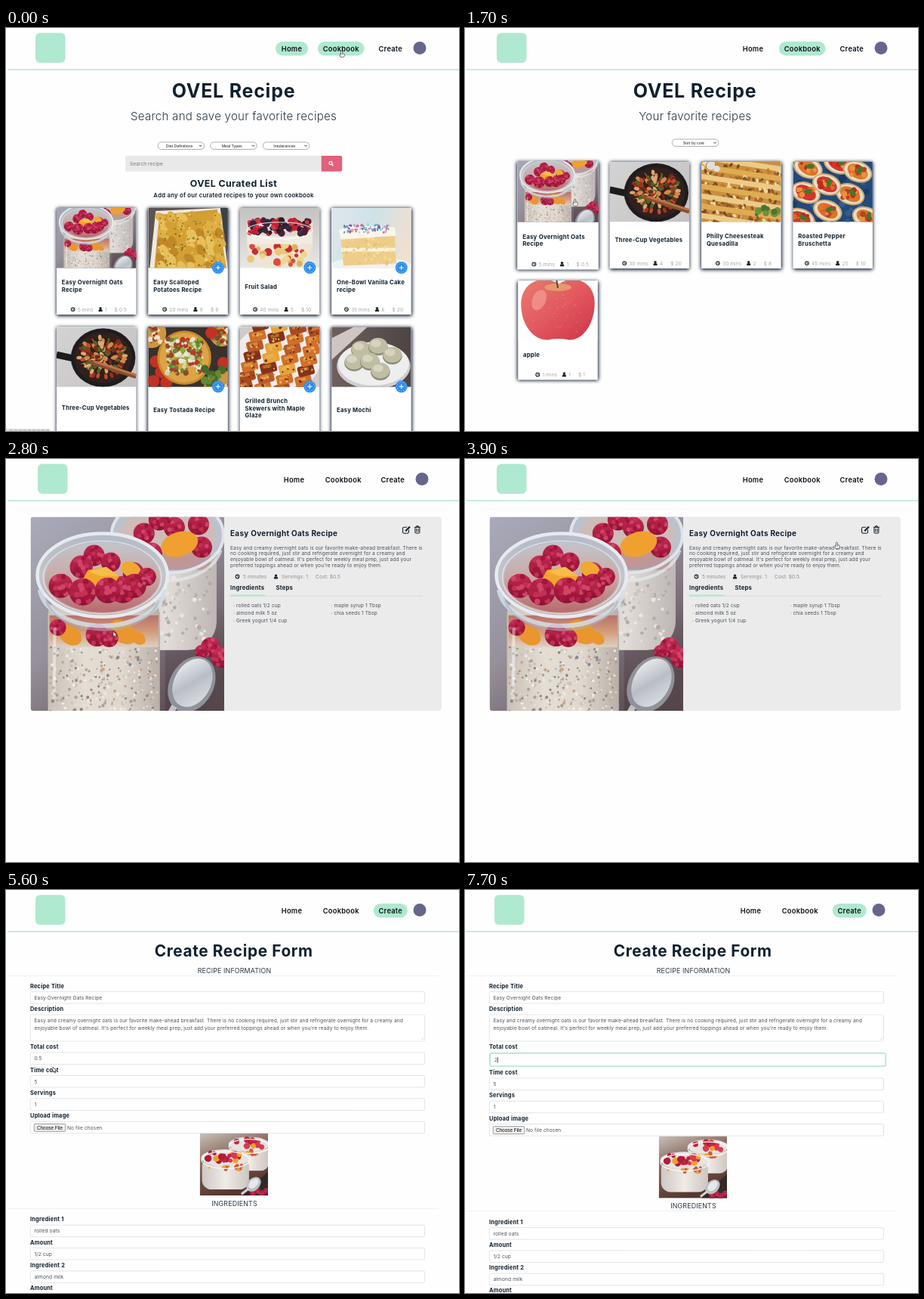
An HTML page with a canvas that plays this animation: 600x533 px, repeating every 8000 ms.

```html
<!DOCTYPE html>
<html lang="en">
<head>
<meta charset="utf-8">
<title>Recipe app demo</title>
<style>
html, body { margin: 0; width: 100%; height: 100%; overflow: hidden; background: #fefefe; }
canvas { display: block; }
</style>
</head>
<body>
<canvas id="stage" width="600" height="533"></canvas>
<script>
const g = document.getElementById('stage').getContext('2d');
const LOOP = 8000, STEP = 100;
const INK = '#10202f', GREY = '#8c8c8c', BODY = '#4c525a', MINT = '#afe9cf';
const SANS = 'Inter, sans-serif', ARIAL = '"Liberation Sans", Arial, sans-serif';

// ---------- drawing helpers ----------
let seed = 1;
const rnd = () => (seed = seed * 16807 % 2147483647) / 2147483647;
const pick = list => list[Math.floor(rnd() * list.length)];

function rect(x, y, w, h, c) { g.fillStyle = c; g.fillRect(x, y, w, h); }
function box(x, y, w, h, r, fill, stroke, lw = 0.7) {
  g.beginPath(); g.roundRect(x, y, w, h, r);
  if (fill) { g.fillStyle = fill; g.fill(); }
  if (stroke) { g.strokeStyle = stroke; g.lineWidth = lw; g.stroke(); }
}
function oval(x, y, rx, ry, c, rot = 0) {
  g.beginPath(); g.ellipse(x, y, rx, ry, rot, 0, 7); g.fillStyle = c; g.fill();
}
const dot = (x, y, r, c) => oval(x, y, r, r, c);
function ring(x, y, rx, ry, c, lw, from = 0, to = 7) {
  g.beginPath(); g.ellipse(x, y, rx, ry, 0, from, to);
  g.strokeStyle = c; g.lineWidth = lw; g.stroke();
}
function line(c, lw, ...p) {
  g.beginPath();
  for (let i = 0; i < p.length; i += 2) g.lineTo(p[i], p[i + 1]);
  g.strokeStyle = c; g.lineWidth = lw; g.stroke();
}
function poly(c, ...p) {
  g.beginPath();
  for (let i = 0; i < p.length; i += 2) g.lineTo(p[i], p[i + 1]);
  g.closePath(); g.fillStyle = c; g.fill();
}
function fade(x0, y0, x1, y1, ...cols) {
  const f = g.createLinearGradient(x0, y0, x1, y1);
  cols.forEach((c, i) => f.addColorStop(i / (cols.length - 1), c));
  return f;
}
function scatter(n, [x, y, w, h], cols, r, flat = 1) {
  for (let i = 0; i < n; i++) {
    const s = r * (0.6 + 0.8 * rnd());
    oval(x + rnd() * w, y + rnd() * h, s, s * flat, pick(cols), rnd() * 3);
  }
}
function setFont(size, weight, family) {
  g.font = `${weight} ${size}px ${family}`;
  g.letterSpacing = family === SANS ? size * (weight >= 600 ? 0.03 : 0.015) + 'px' : '0px';
}
function text(s, x, y, size, weight = 400, color = INK, align = 'left', family = SANS) {
  setFont(size, weight, family);
  g.fillStyle = color; g.textAlign = align;
  g.fillText(s, x, y);
}
function widthOf(s, size) { setFont(size, 400, SANS); return g.measureText(s).width; }

// Clips a box and draws a picture of natural width `nat` inside it.
function photo(x, y, w, h, draw, nat = w, dy = 0) {
  g.save();
  g.beginPath(); g.rect(x, y, w, h); g.clip();
  g.translate(x, y + dy); g.scale(w / nat, w / nat);
  seed = 77;
  draw();
  g.restore();
}

// ---------- food pictures ----------
function berry(x, y, r) {
  dot(x, y, r, fade(x, y - r, x, y + r, '#c62c55', '#8c0f31'));
  for (let k = 0; k < 3; k++) for (let a = k; a < k + 6; a += 1 + k * 0.7) {
    const d = r * (0.78 - k * 0.3);
    dot(x + Math.cos(a) * d, y + Math.sin(a) * d, r * 0.21, pick(['#d04468', '#b41f45', '#a0173b', '#c23056']));
  }
}

function jar() {
  rect(0, 0, 256, 256, fade(0, 0, 190, 256, '#a9abba', '#96909a', '#5c4d53'));
  rect(178, 120, 78, 136, fade(200, 120, 200, 256, 'rgba(90,76,82,0)', '#54454a'));
  // back jar
  box(112, 10, 134, 166, [20, 20, 38, 38], fade(112, 0, 246, 0, '#c3bebd', '#e2ddd8', '#bdb6b4'));
  scatter(90, [120, 78, 118, 88], ['#cbc4bf', '#ebe6e1', '#b3aba8'], 2.2);
  oval(181, 24, 75, 50, '#bcc1cb');
  oval(181, 26, 63, 40, '#cdbcb8');
  rect(124, 46, 114, 24, 'rgba(178,92,92,.4)');
  [[150, 22], [170, 4], [190, 14], [222, 10], [226, 40], [160, 48]].forEach(p => berry(...p, 14));
  oval(197, 36, 25, 16, '#efa02f', -0.3);
  ring(181, 24, 74, 50, '#dfe4ea', 4);
  ring(181, 34, 72, 50, 'rgba(228,233,238,.75)', 4, 0.2, 2.9);
  // front jar
  box(23, 104, 148, 190, 26, fade(23, 0, 171, 0, '#c9c1b8', '#e3ddd4', '#dfd8cf', '#b9afa8'));
  rect(25, 130, 144, 42, fade(0, 130, 0, 172, '#b97169', '#d39a79', '#ddd0c4'));
  [[52, 156, 17], [122, 152, 20], [142, 160, 11]].forEach(([x, y, r]) => oval(x, y, r, r * 0.7, '#e9962f', 0.6));
  [[88, 156, 15], [104, 160, 12], [36, 146, 11]].forEach(p => berry(...p));
  scatter(300, [26, 172, 142, 84], ['#efeae2', '#cdc5bb', '#8b8886', '#e6ded4', '#c9a58c', '#a8a29d'], 1.6);
  oval(95, 77, 87, 55, fade(0, 22, 0, 132, '#b4bac6', '#c5c4ca', '#c1a5a4'));
  oval(95, 80, 76, 46, fade(0, 34, 0, 126, '#c3c4cb', '#c9a9a6', '#b8696b'));
  [[84, 51, 14], [106, 60, 13], [67, 66, 15], [122, 96, 18], [136, 74, 14]].forEach(p => berry(...p));
  poly('#f2a52c', 66, 88, 76, 70, 100, 66, 117, 78, 108, 96, 82, 101);
  poly('#f7bd49', 76, 72, 100, 66, 117, 78, 92, 78);
  oval(133, 70, 14, 10, '#f0a832', 0.5);
  [[40, 91, 16], [69, 99, 18], [102, 97, 17], [137, 91, 16], [154, 79, 12]].forEach(p => berry(...p));
  ring(95, 77, 86, 55, '#e6ebf0', 4.5);
  ring(95, 80, 78, 48, 'rgba(245,248,250,.55)', 1.5);
  ring(95, 91, 83, 53, 'rgba(214,223,232,.85)', 6, 0.1, 3.04);
  ring(95, 101, 76, 48, 'rgba(168,178,190,.6)', 3, 0.2, 2.94);
  line('rgba(255,255,255,.45)', 4, 32, 146, 31, 240);
  // spoon and loose berries
  [[238, 172, 13], [252, 186, 13], [226, 178, 9]].forEach(p => berry(...p));
  oval(213, 221, 29, 39, '#8f9299', 0.5);
  oval(214, 219, 24, 34, fade(195, 190, 230, 250, '#f0f2f4', '#b9bec6', '#dfe2e6'), 0.5);
  line('#bfc2c8', 8, 190, 250, 180, 268);
}

function bowls() {
  rect(0, 0, 90, 82, fade(0, 0, 30, 82, '#c9c0ba', '#806052', '#56372e'));
  poly('#332927', 56, 82, 90, 50, 90, 82);
  function bowl(x, y, r) {
    box(x - r, y, r * 2, r * 1.35, r * 0.4, fade(x - r, 0, x + r, 0, '#cfc8c4', '#efebe7', '#cdc5c0'));
    oval(x, y, r * 1.04, r * 0.36, '#e6e3e2');
    scatter(18, [x - r * 0.75, y - 7, r * 1.4, 11], ['#c3243f', '#b01c3c', '#d93a4d', '#f0a028'], r * 0.13);
    scatter(10, [x - r * 0.8, y + 10, r * 1.55, 5], ['#e9a038', '#ce5a42'], 3, 0.7);
    ring(x, y + 3, r * 1.02, r * 0.36, '#f8f8f8', 1.3);
  }
  bowl(65, 14, 26);
  bowl(34, 32, 31);
  for (let i = 0; i < 4; i++) berry(70 + i * 6, 79 - i % 2 * 3, 4);
  oval(71, 67, 8, 11, '#bdbfc4', 0.8);
  oval(71, 66, 5, 8, '#e7e8ea', 0.8);
  line('#d5d5d8', 3, 64, 73, 55, 80);
}

const foods = {
  potatoes() {
    rect(0, 0, 106, 80, '#5c5452');
    poly('#f0e9df', 10, 4, 96, 0, 106, 80, 2, 80);
    poly('#cf9c33', 15, 9, 92, 2, 104, 80, 8, 80);
    for (let r = 0; r < 7; r++) for (let c = 0; c < 7; c++) {
      oval(17 + c * 12.5 + rnd() * 5, 13 + r * 11, 9, 5.5, pick(['#dfb044', '#e8c05a', '#d3a034', '#bf8829']), 0.4 + rnd());
    }
    scatter(110, [13, 7, 86, 72], ['#5e7c2e', '#a58a2f', '#a86b1d', '#f0d27c'], 1.1);
    poly('#3d4047', 96, 0, 106, 0, 106, 60);
  },
  salad() {
    rect(0, 0, 106, 80, fade(0, 0, 0, 80, '#c3c3c2', '#e9e7e5'));
    box(9, 18, 88, 64, [2, 2, 36, 36], '#eee4d4');
    scatter(34, [14, 48, 78, 28], ['#c92d31', '#e8c877', '#f1d58e', '#dc4a42', '#d9b25e'], 4.2);
    rect(11, 35, 84, 13, '#f1ece2');
    oval(53, 27, 44, 11, '#dfd8d0');
    scatter(105, [12, 16, 80, 18], ['#30283f', '#c51f2e', '#e0353c', '#4d1f38', '#251f30'], 3.3);
    ring(53, 30, 44, 11, 'rgba(255,255,255,.7)', 1.2);
  },
  cake() {
    rect(0, 0, 106, 80, fade(0, 0, 106, 40, '#dfe7ea', '#cfe2e8', '#f0e0cf'));
    oval(52, 78, 56, 13, '#f0f1f2');
    poly('#eecd8a', 12, 38, 84, 33, 86, 74, 16, 77);
    rect(13, 53, 72, 5, '#fbf2dc');
    scatter(70, [15, 40, 68, 34], ['#e6c378', '#f5dda3', '#efcf8e'], 1.7);
    poly('#fbf6ea', 10, 29, 34, 23, 84, 26, 86, 37, 12, 42);
    scatter(80, [16, 22, 60, 11], ['#d65c92', '#5ba8cf', '#7a5ca8', '#f0a0b8', '#8fd0e0'], 1.7, 0.6);
  },
  veg() {
    rect(0, 0, 106, 80, fade(0, 0, 106, 80, '#d4d3d3', '#c4c2c2'));
    line('#1d1b1c', 9, 0, 37, 28, 43);
    oval(62, 41, 43, 39, '#1f1c1d');
    oval(62, 41, 38, 34, '#30211e');
    for (let i = 0; i < 150; i++) {
      const a = rnd() * 6.3, d = Math.sqrt(rnd());
      oval(62 + Math.cos(a) * 32 * d, 40 + Math.sin(a) * 27 * d, 3.7, 2.3,
        pick(['#9f2f1d', '#c9492a', '#6b2f1c', '#d08a4a', '#4f6328', '#3d1813', '#d9a872']), a);
    }
    line('#8b4d2e', 6, 44, 46, 106, 66);
    line('#b8744b', 3, 50, 46, 106, 64);
  },
  tostada() {
    rect(0, 0, 106, 80, '#3a302c');
    [[4, 8, 20], [98, 10, 16], [98, 82, 24]].forEach(([x, y, r]) => {
      dot(x, y, r, '#cf9540');
      scatter(22, [x - 12, y - 12, 24, 24], ['#a8321f', '#6d8a34', '#eedfc7', '#7c4a2c'], 3);
    });
    [[10, 46], [17, 60], [7, 72], [24, 74], [100, 48], [84, 8]].forEach(p => dot(...p, 8, '#c23124'));
    dot(48, 41, 36, '#c98a2b');
    dot(48, 41, 33, '#dba447');
    scatter(190, [25, 16, 46, 46], ['#8bab3a', '#5f8a2f', '#eee4d2', '#b8382b', '#8f4a2e', '#d0d6aa'], 2.7);
    scatter(14, [75, 55, 25, 22], ['#628a35', '#456b28'], 4);
  },
  skewers() {
    rect(0, 0, 106, 80, '#d0cbc8');
    oval(50, 42, 58, 46, '#efecea');
    for (let r = 0; r < 4; r++) for (let c = 0; c < 7; c++) {
      g.save();
      g.translate(6 + r * 25 + c * 3.5, 79 - c * 13.5 + r * 2);
      g.rotate(-0.25);
      box(-11, -7, 22, 14, 3, pick(['#a8481d', '#d0702a', '#e8a23a', '#84331a', '#bb5a28']));
      rect(-7, -4, 11, 4, 'rgba(255,198,92,.4)');
      scatter(5, [-8, -4, 16, 9], ['#6d2a14', '#e9b050'], 1.3);
      g.restore();
    }
    scatter(25, [8, 8, 90, 65], ['#63782c', '#f2c460'], 1);
  },
  mochi() {
    rect(0, 0, 106, 80, fade(0, 0, 106, 0, '#6f605d', '#4b4544'));
    poly('#cfc6c2', 0, 15, 30, 0, 48, 0, 0, 44);
    oval(56, 52, 49, 31, '#cfcdcf');
    oval(56, 49, 47, 29, '#efeeef');
    [[39, 29], [62, 25], [30, 46], [81, 37], [51, 45], [65, 58]].forEach(([x, y]) => {
      oval(x, y + 2, 13, 11, '#8f8d77');
      oval(x, y, 12.5, 10.5, '#bfbea2');
      oval(x - 3, y - 3, 7, 5, '#d6d4c0');
    });
  },
  quesadilla() {
    rect(0, 0, 106, 80, '#c98f40');
    for (let i = 0; i < 8; i++) {
      const y = i * 13 - 10;
      poly(i % 2 ? '#e0ac52' : '#ecca85', 0, y, 106, y + 16, 106, y + 23, 0, y + 7);
      for (let k = 0; k < 34; k++) {
        const x = rnd() * 106;
        oval(x, y + 8 + x * 0.15 + rnd() * 7, 3, 1.8, pick(['#7a4a22', '#a86a2a', '#f0dba4', '#c47a2a', '#8c5a30']), rnd() * 3);
      }
    }
    scatter(8, [70, 60, 36, 20], ['#49742f', '#6b913d'], 4);
    scatter(8, [0, 0, 25, 10], ['#dfe1dc', '#b8833f'], 4);
  },
  bruschetta() {
    rect(0, 0, 106, 80, '#234a78');
    scatter(40, [0, 0, 106, 80], ['#1a3c66', '#2f5d8e'], 4);
    [[20, 8], [60, 2], [86, 13], [17, 41], [76, 43], [45, 30], [46, 65], [10, 76], [98, 74]].forEach(([x, y], i) => {
      oval(x, y, 20, 14, '#cfa878', 0.35);
      oval(x, y, 18, 12, '#ecddc4', 0.35);
      oval(x, y, 14.5, 9, i % 2 ? '#d5342a' : '#d9772a', 0.5);
      scatter(12, [x - 10, y - 6, 20, 11], ['#e8652c', '#c3271f', '#e9913e', '#b5461f'], 3);
      oval(x + 3, y - 2, 5.5, 3.2, '#3f7a2c', i);
    });
  },
  apple() {
    rect(0, 0, 106, 80, '#fefefe');
    g.beginPath();
    g.moveTo(54, 5);
    g.bezierCurveTo(70, -8, 102, -2, 102, 30);
    g.bezierCurveTo(102, 58, 86, 80, 68, 79);
    g.quadraticCurveTo(53, 76, 40, 79);
    g.bezierCurveTo(20, 80, 4, 58, 4, 32);
    g.bezierCurveTo(4, -2, 38, -8, 54, 5);
    g.fillStyle = fade(20, 0, 85, 80, '#e8756c', '#e2585f', '#cf3a4c');
    g.fill();
    oval(53, 9, 18, 5, '#e39a70');
    oval(28, 26, 9, 14, 'rgba(255,196,186,.4)', 0.4);
    scatter(50, [20, 18, 68, 50], ['rgba(247,176,150,.4)'], 0.7);
    line('#6b4526', 2.2, 53, 10, 51, -2);
  }
};

// ---------- icons ----------
function clock(x, y) {
  dot(x, y, 2.9, '#1a2430');
  dot(x, y, 1.8, '#fff');
  line('#1a2430', 0.8, x, y - 1.6, x, y + 0.3, x + 1.4, y + 0.3);
}
function person(x, y) {
  dot(x, y - 1.4, 1.7, '#1a2430');
  box(x - 2.6, y - 0.1, 5.2, 3, [1.8, 1.8, 0.5, 0.5], '#1a2430');
}
function badge(x, y) {
  dot(x, y, 8, '#2f8de8');
  for (let a = 0; a < 6.2; a += Math.PI / 6) dot(x + Math.cos(a) * 6, y + Math.sin(a) * 6, 0.7, '#8cc4f8');
  line('#e2f0fd', 1.2, x - 3, y, x + 3, y);
  line('#e2f0fd', 1.2, x, y - 3, x, y + 3);
}
function select(x, y, label) {
  box(x, y, 61.5, 9.5, 4.7, '#fff', '#8d8d8d');
  text(label, x + 28.5, y + 6.6, 5.3, 400, '#222', 'center', ARIAL);
  line('#222', 0.9, x + 55, y + 3.9, x + 56.7, y + 5.6, x + 58.4, y + 3.9);
}

// ---------- page parts ----------
function header(dx, active) {
  box(42 + dx, 6.5, 39.5, 39.5, 6, MINT);
  [['Home', 381.5, 43], ['Cookbook', 446.7, 61.5], ['Create', 512.3, 45]].forEach(([s, x, w]) => {
    if (active.includes(s)) box(x + dx - w / 2, 18, w, 18.5, 9.2, MINT);
    text(s, x + dx, 30.7, 9.3, 600, '#0b1118', 'center');
  });
  dot(551 + dx, 26.5, 8.5, '#66668c');
  rect(2, 54.3, 598, 1.4, MINT);
}

const CARD = 105.4;
function card({ x, y, h, data, hover, marked }) {
  const [food, title, base, mins, people, cost] = data;
  g.save();
  if (hover) {
    const cx = x + CARD / 2, cy = y + h / 2;
    g.translate(cx, cy); g.scale(1.02, 1.02); g.translate(-cx, -cy);
  }
  g.shadowColor = 'rgba(12,24,46,.8)'; g.shadowBlur = 5; g.shadowOffsetY = 1;
  rect(x, y, CARD, h, '#fff');
  rect(x, y, CARD, h, '#fff');
  g.shadowColor = 'transparent';
  if (food === 'oats') photo(x, y, CARD, 79.5, jar, 256, -13);
  else photo(x, y, CARD, 79.5, foods[food], 106);
  title.split('|').forEach((s, i) => text(s, x + 6.8, y + base + i * 9.5, 7.7, 700));
  const time = mins + ' mins', price = '$ ' + cost, n = String(people), s = 6.6;
  const a = widthOf(time, s), b = widthOf(n, s), c = widthOf(price, s);
  const my = y + h - 4.5;
  let px = x + 56 - (a + b + c + 34) / 2;
  clock(px + 2.8, my - 2.4); px += 9;
  text(time, px, my, s, 300, GREY); px += a + 6.5;
  person(px + 2.6, my - 2.5); px += 8.5;
  text(n, px, my, s, 300, GREY); px += b + 10;
  text(price, px, my, s, 300, GREY);
  if (marked) badge(x + 92.5, y + 79);
  g.restore();
}

// Lays recipes out four to a row.
function grid(list, x0, y0, rowGap, heights, extra = {}) {
  return list.map((data, i) => {
    const row = Math.floor(i / 4);
    return { x: x0 + (i % 4) * 121.4, y: y0 + row * rowGap, h: heights[row], data, marked: extra.badges && i % 4 > 0 };
  });
}
const OATS = ['oats', 'Easy Overnight Oats|Recipe', 101, 5, 1, 0.5];
const curated = grid([
  OATS,
  ['potatoes', 'Easy Scalloped|Potatoes Recipe', 101, 20, 8, 8],
  ['salad', 'Fruit Salad', 107, 40, 5, 10],
  ['cake', 'One-Bowl Vanilla Cake|recipe', 101, 35, 6, 20],
  ['veg', 'Three-Cup Vegetables', 110, 30, 4, 20],
  ['tostada', 'Easy Tostada Recipe', 113, 25, 4, 12],
  ['skewers', 'Grilled Brunch|Skewers with Maple|Glaze', 101, 30, 6, 18],
  ['mochi', 'Easy Mochi', 113, 30, 6, 8]
], 67, 238, 157.3, [141, 150], { badges: true });
const saved = grid([
  OATS,
  ['veg', 'Three-Cup Vegetables', 105.5, 30, 4, 20],
  ['quesadilla', 'Philly Cheesesteak|Quesadilla', 101, 30, 2, 8],
  ['bruschetta', 'Roasted Pepper|Bruschetta', 101, 45, 25, 10],
  ['apple', 'apple', 101, 1, 1, 1]
], 70.3, 177, 157, [141, 131.3]);
const inside = (c, [x, y]) => x > c.x && x < c.x + CARD && y > c.y && y < c.y + c.h;

function statusBar() {
  rect(0, 530, 58.5, 3, '#dcdee0');
  for (let x = 5; x < 54; x += 6) rect(x, 531.5, 4, 1, '#a9adb2');
}

function home() {
  header(-3, ['Home', 'Cookbook']);
  text('OVEL Recipe', 301.5, 92, 25, 700, INK, 'center');
  text('Search and save your favorite recipes', 301.5, 121.5, 15.1, 300, '#2b3846', 'center');
  select(201, 151, 'Diet Definitions');
  select(270.7, 151, 'Meal Types');
  select(340.3, 151, 'Intolerances');
  box(158, 169, 260, 20.7, [2, 0, 0, 2], '#e9e9e9');
  text('Search recipe', 164, 181.8, 6.5, 400, '#777');
  box(417.7, 169, 27.5, 20.7, [0, 2, 2, 0], '#e2607b');
  ring(430, 178.7, 2, 2, '#fff', 1.2);
  line('#fff', 1.4, 431.5, 180.2, 433.5, 182.2);
  text('OVEL Curated List', 301.5, 209.7, 12.4, 700, INK, 'center');
  text('Add any of our curated recipes to your own cookbook', 301.5, 224, 7.75, 600, INK, 'center');
  curated.forEach(card);
}

function cookbook(at) {
  header(0, ['Cookbook']);
  text('OVEL Recipe', 304.5, 92, 25, 700, INK, 'center');
  text('Your favorite recipes', 304.8, 121.5, 15.1, 300, '#2b3846', 'center');
  select(274.3, 147, 'Sort by cost');
  saved.forEach(c => card({ ...c, hover: inside(c, at) }));
}

function recipe() {
  header(0, []);
  g.save();
  g.beginPath(); g.roundRect(32.5, 76.5, 544.5, 256.5, 4); g.clip();
  rect(32, 76, 546, 258, '#ebebeb');
  photo(32.5, 76.5, 256.5, 256.5, jar, 256);
  g.restore();
  text('Easy Overnight Oats Recipe', 297, 102.2, 9.95, 700);
  // edit and trash icons
  box(525.5, 90.2, 8, 8, 1.6, null, INK, 1.1);
  line('#ebebeb', 4, 529.5, 94.5, 536, 88.5);
  line(INK, 2.2, 529.2, 95.2, 535, 89.5);
  line(INK, 1, 540.8, 90.2, 549, 90.2);
  line(INK, 1, 543.4, 90, 543.9, 88.5, 546, 88.5, 546.5, 90);
  box(541.9, 90.3, 6, 7.8, 1, null, INK, 1);
  for (let x = 543.4; x < 547; x += 1.5) line(INK, 0.7, x, 92, x, 96.5);
  ['Easy and creamy overnight oats is our favorite make-ahead breakfast. There is',
    'no cooking required, just stir and refrigerate overnight for a creamy and',
    "enjoyable bowl of oatmeal. It's perfect for weekly meal prep, just add your",
    "preferred toppings ahead or when you're ready to enjoy them."
  ].forEach((s, i) => text(s, 297, 119.5 + i * 7.9, 6.65, 400, BODY));
  clock(306.5, 155.5);
  text('5 minutes', 314, 158, 6.6, 400, GREY);
  person(357.5, 155.5);
  text('Servings: 1', 365, 158, 6.6, 400, GREY);
  text('Cost: $0.5', 410, 158, 6.6, 400, GREY);
  text('Ingredients', 297, 173.2, 7.7, 700);
  text('Steps', 357.5, 173.2, 7.7, 700);
  rect(297, 180.8, 255, 0.7, '#cfd3d6');
  rect(297, 179.5, 46.5, 2, MINT);
  [['rolled oats 1/2 cup', 305, 0], ['almond milk 5 oz', 305, 1], ['Greek yogurt 1/4 cup', 305, 2],
    ['maple syrup 1 Tbsp', 434.5, 0], ['chia seeds 1 Tbsp', 434.5, 1]
  ].forEach(([s, x, i]) => {
    dot(x - 3, 194 + i * 10, 0.8, '#d9bf72');
    text(s, x, 196.4 + i * 10, 6.6, 400, BODY);
  });
}

function field(label, value, y, h = 15.5) {
  text(label, 32, y - 5, 7.4, 700);
  box(32.3, y, 522.2, h, 1.5, '#fff', '#d7dadd');
  value.split('|').forEach((s, i) => text(s, 37.5, y + 10.2 + i * 9.6, 6.65, 400, BODY));
}

function section(title, y) {
  text(title, 302.5, y, 8.9, 400, '#2b3846', 'center');
  rect(2, y + 3.5, 571, 0.7, '#ececec');
}

function typed(t) {
  return t < 7100 ? '0.5' : t < 7200 ? '0.' : t < 7400 ? '0' : t < 7700 ? '' : '2';
}

function form(t) {
  const focus = t >= 6200;
  header(-3, ['Create']);
  text('Create Recipe Form', 301.7, 88, 20.8, 700, INK, 'center');
  section('RECIPE INFORMATION', 109.5);
  field('Recipe Title', 'Easy Overnight Oats Recipe', 134.5);
  field('Description', 'Easy and creamy overnight oats is our favorite make-ahead breakfast. There is no cooking required, just stir and refrigerate overnight for a creamy and|' +
    "enjoyable bowl of oatmeal. It's perfect for weekly meal prep, just add your preferred toppings ahead or when you're ready to enjoy them.", 165, 35);
  line('#999', 0.5, 550, 198.5, 553, 195.5);
  field('Total cost', focus ? '' : '0.5', 215);
  if (focus) {
    const s = typed(t), cx = 39.3 + widthOf(s, 6.65);
    box(33.2, 216, 523.8, 17, 1.5, '#fff', MINT, 1.7);
    text(s, 39, 226.9, 6.65, 400, BODY);
    line('#222', 0.7, cx, 221, cx, 228.5);
  }
  g.save();
  if (focus) g.translate(0, 3.4);
  field('Time cost', '5', 245.5);
  field('Servings', '1', 275.8);
  field('Upload image', '', 306.2);
  box(37.3, 309.3, 41.5, 10, 1, '#efefef', '#777', 0.7);
  text('Choose File', 58, 316.6, 6.4, 400, '#111', 'center', ARIAL);
  text('No file chosen', 81, 316.6, 6.6, 400, BODY);
  photo(256.7, 322, 90.3, 82, bowls, 90);
  section('INGREDIENTS', 417.5);
  field('Ingredient 1', 'rolled oats', 443.2);
  field('Amount', '1/2 cup', 473.5);
  field('Ingredient 2', 'almond milk', 503.8);
  field('Amount', '5 oz', 534);
  g.restore();
}

// ---------- pointer ----------
const route = [
  [0, 444.5, 30], [900, 443, 30], [1000, 443, 30], [1400, 499, 452], [1700, 145.5, 226.5],
  [1900, 146, 228], [2300, 168, 247], [2400, 142, 228], [2900, 142, 228], [3400, 302, 188],
  [4000, 530.5, 94.5], [4600, 530.3, 94.8], [4900, 63, 235], [5200, 63, 235], [5600, 62, 234],
  [5900, 62, 234], [6200, 61, 227]
];
const clicks = [[600, 1000], [2600, 2800], [4000, 4400], [6200, 6600]];

function pointer(t) {
  const i = route.findIndex(k => k[0] > t);
  if (i < 0) return route[route.length - 1].slice(1);
  const [a, x0, y0] = route[i - 1], [b, x1, y1] = route[i];
  const p = (t - a) / (b - a);
  return [x0 + (x1 - x0) * p, y0 + (y1 - y0) * p];
}
function drawPointer(t, at) {
  const [x, y] = at;
  if (clicks.some(([a, b]) => t >= a && t < b)) {
    dot(x, y + 0.5, 6.3, 'rgba(232,80,76,.55)');
    ring(x, y + 0.5, 5.8, 5.8, 'rgba(222,62,62,.5)', 1);
  }
  if (t >= 6200) return;
  const onCard = t < 2700 && saved.some(c => inside(c, at));
  const onIcon = t >= 3900 && t < 4400;
  g.save();
  g.translate(x, y);
  if (y < 37 || onCard || onIcon) {
    box(-2.3, 3.6, 6, 5, 1.8, '#fff', '#333', 0.7);
    box(-0.9, 0, 2, 6, 1, '#fff', '#333', 0.7);
    rect(-0.5, 3.5, 1.2, 3, '#fff');
  } else {
    poly('#fff', 0, 0, 0, 7, 1.7, 5.5, 2.8, 8, 4, 7.5, 2.9, 5, 5, 5);
    line('#333', 0.7, 0, 0, 0, 7, 1.7, 5.5, 2.8, 8, 4, 7.5, 2.9, 5, 5, 5, 0, 0);
  }
  g.restore();
}

// ---------- loop ----------
function draw(t) {
  const at = pointer(t);
  rect(0, 0, 600, 533, '#fefefe');
  if (t < 700) home();
  else if (t < 2700) cookbook(at);
  else if (t < 4400) recipe();
  else form(t);
  if (t < 1400) statusBar();
  drawPointer(t, at);
}

const start = performance.now();
let last = -1;
function tick() {
  const t = Math.floor((performance.now() - start) % LOOP / STEP) * STEP;
  if (t !== last) draw(last = t);
  requestAnimationFrame(tick);
}
tick();
</script>
</body>
</html>
```
